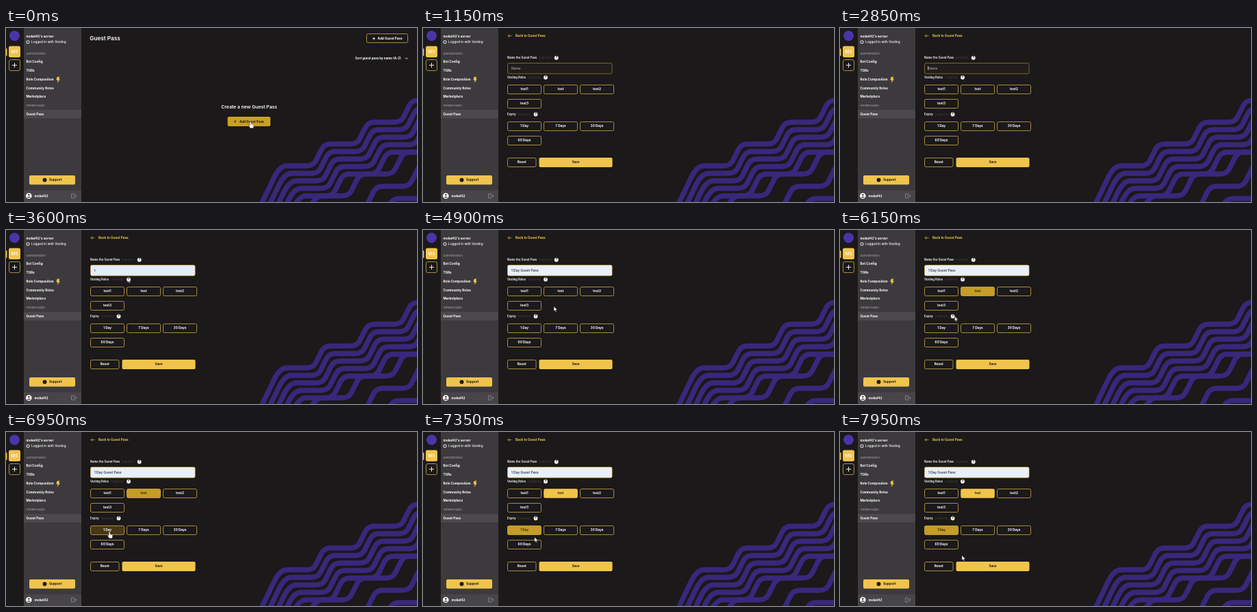
An HTML page that plays this animation: 600x255 px, repeating every 8 s.

```html
<!DOCTYPE html>
<html lang="en">
<head>
<meta charset="utf-8">
<title>Guest Pass</title>
<style>
html, body { margin: 0; width: 100%; height: 100%; overflow: hidden; background: #1b191a; }
svg { display: block; width: 100%; height: 100%; }
text { font: 700 4.7px Inter, "Liberation Sans", sans-serif; fill: #fff; }
.mid { text-anchor: middle; }
.dim { font-weight: 500; font-size: 4.1px; fill: #9b999b; }
.label { font-weight: 600; font-size: 4.2px; }
.req { font-weight: 400; font-size: 4px; fill: #434043; }
.ink { fill: #211c12; }
.gold { fill: #f0c44c; }
.line { fill: none; stroke: #d9b248; stroke-width: .75; }
.white { fill: none; stroke: #fff; stroke-width: .9; }
.waves { fill: none; stroke: #38287d; stroke-width: 7.4; }
.field { fill: #211d1b; stroke: #957631; stroke-width: .8; }
.value { font-weight: 500; font-size: 4.9px; }

/* Everything shares one 8 s clock: 1% is 80 ms. */
.home, .form, .field, .value, .caret, .cursor, .arrow, .hand, .b-test rect, .b-test text, .b-day rect, .b-day text {
  animation-duration: 8s; animation-iteration-count: infinite; animation-timing-function: linear;
}
.home, .form, .value, .caret, .arrow, .hand { animation-timing-function: step-end; }
.home { animation-name: home; }
.form { animation-name: form; }
.field { animation-name: field; }
.name { animation-name: name; fill: #a9a6a3; }
.first { animation-name: first; }
.full { animation-name: full; fill: #202027; }
.caret { animation-name: caret; }
.cursor { animation-name: move; }
.arrow { animation-name: arrow; }
.hand { animation-name: hand; }
.b-test rect { animation-name: test; }
.b-test text { animation-name: test-ink; }
.b-day rect { animation-name: day; }
.b-day text { animation-name: day-ink; }

@keyframes home { 0% { opacity: 1 } 8.125% { opacity: 0 } }
@keyframes form { 0% { opacity: 0 } 8.125% { opacity: 1 } }
@keyframes field {
  0%, 44.99% { fill: #211d1b; stroke: #957631 }
  45%, 47.49% { fill: #e4edfc; stroke: #d9b248 }
  48.1%, 100% { fill: #e8f0fe; stroke: #d9b248 }
}
@keyframes name { 0% { opacity: 1 } 40.625% { opacity: 0 } }
@keyframes caret { 0% { opacity: 0 } 35.625% { opacity: 1 } 40.625% { opacity: 0 } }
@keyframes first {
  0% { opacity: 0; fill: #fff }
  40.625% { opacity: 1; fill: #fff }
  45% { opacity: 1; fill: #202027 }
  52.5% { opacity: 0; fill: #202027 }
}
@keyframes full { 0% { opacity: 0 } 52.5% { opacity: 1 } }
@keyframes move {
  0%, 7.5% { transform: translate(357px, 137px) }
  12.5%, 14.37% { transform: translate(269px, 63px) }
  14.38%, 55% { transform: translate(177.5px, 70px) }
  58% { transform: translate(182px, 89px) }
  61.25% { transform: translate(191px, 112px) }
  62.2% { transform: translate(192px, 112px) }
  65% { transform: translate(198px, 92px) }
  67.5%, 72% { transform: translate(198.5px, 90px) }
  75% { transform: translate(182px, 114px) }
  79.4% { transform: translate(148px, 143px) }
  84.4%, 88.8% { transform: translate(151px, 146px) }
  93% { transform: translate(167px, 157px) }
  96.9% { transform: translate(174px, 169px) }
  99.375%, 100% { transform: translate(178px, 181px) }
}
@keyframes arrow {
  0% { opacity: 0 } 8.125% { opacity: 1 } 14.375% { opacity: 0 } 45% { opacity: 1 }
  65.6% { opacity: 0 } 73.2% { opacity: 1 } 78.8% { opacity: 0 } 90.6% { opacity: 1 }
}
@keyframes hand {
  0% { opacity: 1 } 8.125% { opacity: 0 } 65.6% { opacity: 1 }
  73.2% { opacity: 0 } 78.8% { opacity: 1 } 90.6% { opacity: 0 }
}
@keyframes test {
  0%, 65.2% { fill: #1b191a } 67.5%, 70.6% { fill: #493719 }
  72.5%, 88.1% { fill: #c59c25 } 90%, 100% { fill: #f0c44c }
}
@keyframes test-ink { 0%, 70.6% { fill: #fff } 72.5%, 100% { fill: #3a2c0c } }
@keyframes day {
  0%, 79.4% { fill: #1b191a } 82.5%, 88.1% { fill: #493719 } 90%, 100% { fill: #c59c25 }
}
@keyframes day-ink { 0%, 88.1% { fill: #fff } 90%, 100% { fill: #3a2c0c } }
</style>
</head>
<body>
<svg viewBox="0 0 600 255" preserveAspectRatio="none">
  <rect width="600" height="255" fill="#1b191a"/>
  <g class="waves" id="waves"></g>

  <!-- server rail -->
  <circle cx="12.5" cy="11.5" r="7.5" fill="#4a35a8"/>
  <rect class="gold" y="30" width="1.5" height="11" rx=".7"/>
  <rect class="gold" x="4" y="26.500" width="17" height="16.500" rx="2.500"/>
  <text class="mid" x="12.500" y="37" style="font-size:6.6px;font-weight:500">MS</text>
  <rect class="line" x="4.500" y="46.500" width="16" height="16" rx="2.500"/>
  <path class="white" d="M9 54.500h7M12.500 51v7"/>

  <!-- sidebar -->
  <rect x="26" width="84" height="255" fill="#3c3a3c"/>
  <rect x="26" y="120" width="84" height="12.5" fill="#4b494b"/>
  <rect x="26" y="238" width="84" height="17" fill="#474547"/>
  <text x="29.5" y="14">mokel42's server</text>
  <rect class="white" x="30" y="18.8" width="4" height="3.6" rx="1"/>
  <text x="37" y="22.2" style="font-weight:500">Logged in with Vexling</text>
  <text class="dim" x="29.5" y="38.5">Administration</text>
  <g id="menu"></g>
  <path class="gold" d="M74.4 72l3.8-.7-1.1 3.2 1.8.2-4 6 .8-4.3-2.3-.1z"/>
  <text class="dim" x="29.5" y="114.5">Installed apps</text>
  <rect class="gold" x="34" y="216" width="67" height="13.5" rx="2"/>
  <circle class="ink" cx="56.5" cy="222.7" r="3"/>
  <text class="ink" x="63" y="224.4">Support</text>
  <circle cx="33.3" cy="246" r="4.3" fill="#fff"/>
  <circle cx="33.3" cy="244.6" r="1.4" fill="#474547"/>
  <path d="M30.6 248.8a2.8 2.4 0 0 1 5.4 0z" fill="#474547"/>
  <text x="41.5" y="247.8">mokel42</text>
  <path d="M100 244v-1h-4.5v6h4.5v-1M98 246h5m-1.6-1.6l1.6 1.6-1.6 1.6" fill="none" stroke="#aaa8aa" stroke-width=".6"/>

  <g class="home">
    <text x="122.3" y="17.6" style="font-size:8.2px;font-weight:600">Guest Pass</text>
    <rect class="line" x="526.5" y="8.5" width="60" height="13" rx="2"/>
    <path class="white" d="M535 15.5h4M537 13.5v4"/>
    <text x="542.5" y="17">Add Guest Pass</text>
    <text x="509.8" y="46" style="font-size:4.5px">Sort guest pass by name (A-Z)</text>
    <path class="white" d="M582.8 43.6l1.8 1.8 1.8-1.8"/>
    <text class="mid" x="355" y="117.6" style="font-size:6.8px;font-weight:600">Create a new Guest Pass</text>
    <rect x="323.5" y="130" width="62.5" height="14" rx="2" fill="#c9a026"/>
    <path d="M332.5 137h4M334.5 135v4" stroke="#211c12" stroke-width=".7"/>
    <text class="ink" x="340.7" y="138.6">Add Guest Pass</text>
  </g>

  <g class="form">
    <path class="line" d="M129.5 11.5h-5.5m2.3-2.3l-2.3 2.3 2.3 2.3"/>
    <text class="gold" x="135" y="12.6">Back to Guest Pass</text>
    <g id="labels"></g>
    <rect class="field" x="123.5" y="51.5" width="152.5" height="15.5" rx="2"/>
    <text class="value name" x="129" y="60.5">Name</text>
    <text class="value first" x="129" y="60.5">t</text>
    <text class="value full" x="128.7" y="60.5">1 Day Guest Pass</text>
    <rect class="caret" x="128.4" y="56" width=".6" height="5.5" fill="#fff"/>
    <g id="buttons"></g>
    <rect class="line" x="123.5" y="190.5" width="41.5" height="13" rx="2"/>
    <text class="mid" x="144.2" y="198.3">Reset</text>
    <rect class="gold" x="169.5" y="190" width="107" height="14" rx="2"/>
    <text class="mid ink" x="223" y="198.3">Save</text>
  </g>

  <g class="cursor" stroke="#222" stroke-width=".4" stroke-linejoin="round" fill="#fff">
    <path class="arrow" d="M0 0v7l1.6-1.5 1.1 2.5 1.1-.5-1.1-2.4h2.2z"/>
    <path class="hand" d="M-.9.7q.9-1.4 1.8 0v3l3 .8q.9.3.8 1.4l-.7 3.9h-4.3l-2.5-3.7q-.5-1.3.8-.9l1.1 1z"/>
  </g>
</svg>
<script>
const put = (id, html) => { document.getElementById(id).innerHTML = html; };

// Rounded staircase climbing to the right.
const stair = (x, y) =>
  `<path d="M${x - 34} ${y + 62}l20-42q9-20 20-20${'h29q9 0 13-7l9-18q4-7 13-7'.repeat(4)}"/>`;
put('waves', [0, 1, 2, 3, 4].map(k => stair(404 + 7 * k, 202 + 11 * k)).join('') +
  [0, 1, 2].map(k => stair(456 + 24 * k, 246 + 18 * k)).join(''));

const items = [['Bot Config', 51.4], ['TGRs', 64], ['Role Composition', 77], ['Community Roles', 89.6],
  ['Marketplace', 102.2], ['Guest Pass', 127.6]];
put('menu', items.map(([s, y]) => `<text x="29.5" y="${y}">${s}</text>`).join(''));

const label = (s, y, req, mark) => `<text class="label" x="123" y="${y + 1.5}">${s}</text>
  <text class="req" x="${req}" y="${y + 1.4}">(required)</text>
  <circle cx="${mark}" cy="${y}" r="2.9" fill="#fff"/>
  <text class="mid ink" x="${mark}" y="${y + 1.7}">?</text>`;
put('labels', label('Name the Guest Pass', 43.7, 168.5, 194.7) +
  label('Vexling Roles', 72.5, 153, 179) + label('Expiry', 126.5, 138.5, 164.5));

const button = (s, i, top, name) => {
  const x = 123.5 + 53 * (i % 3), y = top + 21 * Math.floor(i / 3);
  return `<g class="${name}"><rect class="line" x="${x}" y="${y}" width="49" height="13" rx="2"/>
    <text class="mid" x="${x + 24.5}" y="${y + 7.8}">${s}</text></g>`;
};
put('buttons',
  ['test1', 'test', 'test2', 'test3'].map((s, i) => button(s, i, 83.5, i === 1 ? 'b-test' : '')).join('') +
  ['1 Day', '7 Days', '30 Days', '60 Days'].map((s, i) => button(s, i, 137.5, i ? '' : 'b-day')).join(''));
</script>
</body>
</html>
```
